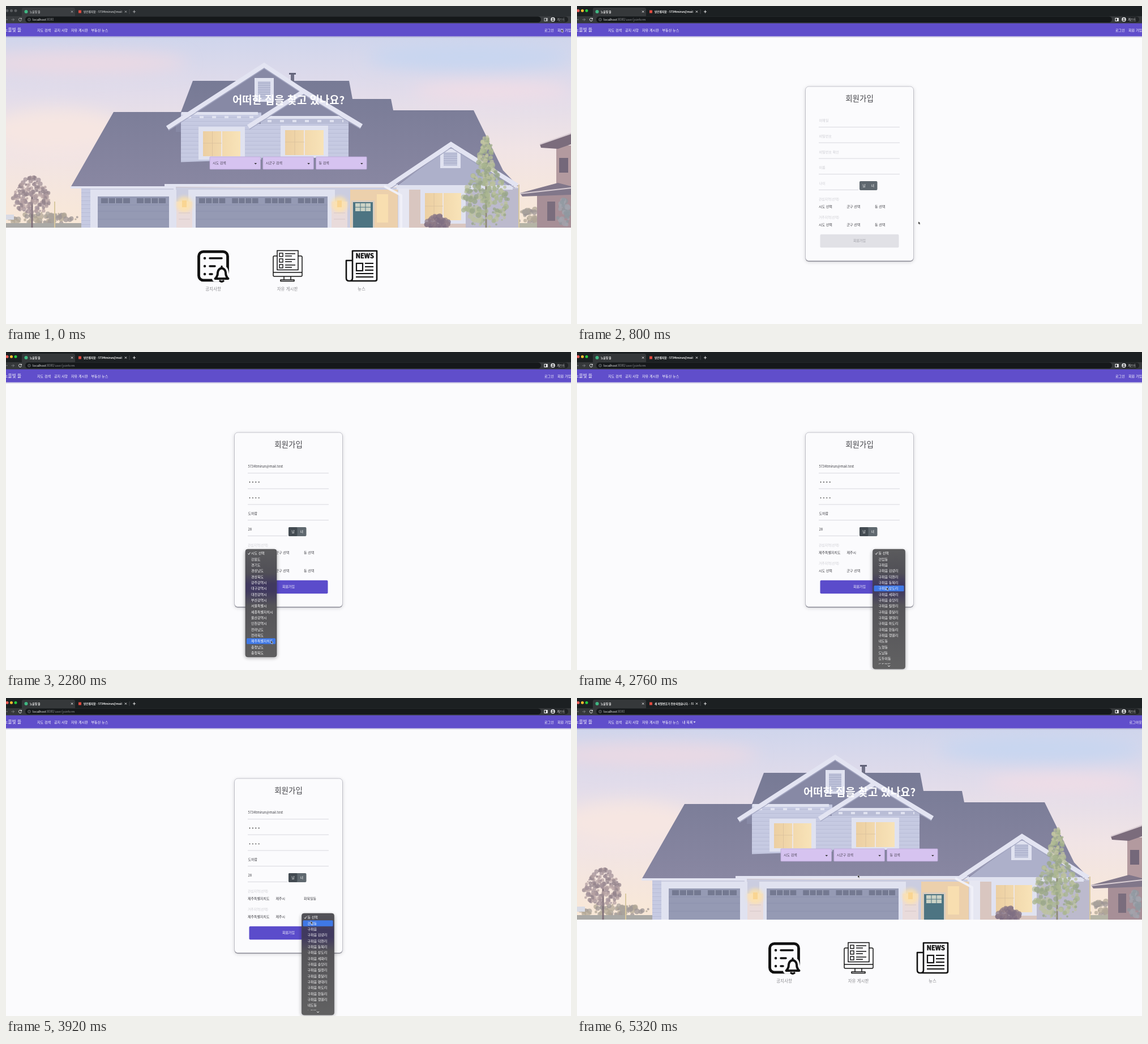
Animation of 998x561 px, one loop 5360 ms. Source, as an HTML page:

```html
<!DOCTYPE html>
<html lang="ko">
<head>
<meta charset="utf-8">
<style>
html, body { margin: 0; width: 100%; height: 100%; overflow: hidden; background: #fbfbfd; }
svg { display: block; width: 998px; height: 561px; font-family: "Noto Sans CJK KR", "Noto Sans CJK", "Noto Sans", sans-serif; }
text { white-space: pre; }
</style>
</head>
<body>
<svg viewBox="0 0 998 561">
  <defs>
    <linearGradient id="sky" x2="0" y2="1">
      <stop offset="0" stop-color="#cfd5ec"/><stop offset=".3" stop-color="#e2dcea"/>
      <stop offset=".6" stop-color="#f1e4e5"/><stop offset="1" stop-color="#f9e8d6"/>
    </linearGradient>
    <linearGradient id="roof" gradientUnits="userSpaceOnUse" x1="0" x2="0" y1="132" y2="320">
      <stop offset="0" stop-color="#777a95"/><stop offset="1" stop-color="#8987a2"/>
    </linearGradient>
    <linearGradient id="glass"><stop offset="0" stop-color="#eccfa2"/><stop offset="1" stop-color="#f8e3b8"/></linearGradient>
    <linearGradient id="menu" gradientUnits="userSpaceOnUse" x1="0" x2="0" y1="348" y2="559">
      <stop offset="0" stop-color="#5b5b5d"/><stop offset=".2" stop-color="#504f56"/>
      <stop offset=".29" stop-color="#40395f"/><stop offset=".35" stop-color="#40395f"/>
      <stop offset=".47" stop-color="#555458"/><stop offset="1" stop-color="#616162"/>
    </linearGradient>
    <pattern id="siding" width="20" height="7" patternUnits="userSpaceOnUse">
      <rect width="20" height="7" fill="#c6cae2"/><rect width="20" height="1" fill="#b9bdd7"/>
    </pattern>
    <filter id="soft" x="-50%" y="-50%" width="200%" height="200%"><feGaussianBlur stdDeviation="14"/></filter>
    <filter id="shade" x="-20%" y="-20%" width="140%" height="140%"><feGaussianBlur stdDeviation="3"/></filter>
    <clipPath id="photo"><rect y="53" width="998" height="338"/></clipPath>
    <clipPath id="tab"><rect x="137" width="69" height="18"/></clipPath>
  </defs>
  <g id="home"></g>
  <g id="live"></g>
</svg>
<script>
const LOOP = 5360, STEP = 40, ROW = 10.33;
const SITE = '노을빛 뜰', MAIL = '5734tmirun@mail.test', PERSON = '도하람';
const INK = '#3b3b40', PALE = '#cdcdd3', BRAND = '#5b4ccb';

const R = (x, y, w, h, fill, more = '') => `<rect x="${x}" y="${y}" width="${w}" height="${h}" fill="${fill}" ${more}/>`;
const P = (fill, points) => `<polygon fill="${fill}" points="${points}"/>`;
const C = (x, y, r, fill, more = '') => `<circle cx="${x}" cy="${y}" r="${r}" fill="${fill}" ${more}/>`;
const L = (d, stroke = '#111', w = 1, more = '') => `<path d="${d}" fill="none" stroke="${stroke}" stroke-width="${w}" ${more}/>`;
// y is the visual middle of the line of text
const T = (x, y, s, size = 6.1, fill = INK, more = '') =>
  `<text x="${x}" y="${(y + size * .36).toFixed(2)}" font-size="${size}" fill="${fill}" ${more}>${s}</text>`;
const MID = 'text-anchor="middle"', END = 'text-anchor="end"';
const clamp = v => Math.max(0, Math.min(1, v));
const ease = v => v * v * (3 - 2 * v);

function foliage(seed, x, y, rx, ry, n, colors, size = 4) {
  const rnd = () => (seed = seed * 16807 % 2147483647) / 2147483647;
  let out = '';
  for (let i = 0; i < n; i++) {
    const a = rnd() * 6.283, d = Math.sqrt(rnd());
    const px = x + Math.cos(a) * d * rx * (.75 + .25 * Math.sin(a)), py = y + Math.sin(a) * d * ry;
    out += C(px.toFixed(1), py.toFixed(1), (size * (.4 + rnd())).toFixed(1), colors[i % colors.length], 'opacity=".75"');
  }
  return out;
}

function house() {
  const trim = '#e0e2f0', edge = '#e3e4f2', wall = 'url(#siding)', roof = 'url(#roof)', glass = 'url(#glass)';
  const gable = (d, w = 8) => L(d, edge, w, 'stroke-linejoin="miter"');
  const windowAt = (x, y, w, h) => R(x, y, w, h, trim) + R(x + 8, y + 8, w - 16, h - 14, glass)
    + L(`M${x + w / 2} ${y + 8}v${h - 14}`, '#eee6e4', 2) + L(`M${x + 8} ${y + h / 2}h${w / 2 - 8}M${x + w / 4 + 4} ${y + 8}v${h - 14}`, '#d9bf9c', .8);
  const vent = (x, y, w, h) => R(x, y, w, h, trim) + R(x + 6, y + 6, w - 12, h - 10, '#bfc3da')
    + L(Array.from({ length: (h - 12) / 4 | 0 }, (_, i) => `M${x + 6} ${y + 9 + i * 4}h${w - 12}`).join(''), '#9ea3c1', .8);
  const garage = (x, w, panes) => {
    let out = R(x - 13, 324, w + 26, 67, trim) + R(x, 336, w, 55, '#959ab4')
      + L(`M${x} 351h${w}M${x} 362h${w}M${x} 376h${w}`, '#8a8fab', .8);
    const gap = w / panes;
    for (let i = 0; i < panes; i++)
      out += R(x + gap * i + 6, 339, gap - 12, 9, '#747991') + L(`M${x + gap * (i + .5)} 339v9M${x + gap * (i + .3)} 339v9M${x + gap * (i + .7)} 339v9`, '#b3b8cc', 1);
    return out;
  };
  const lamp = x => R(x - 14, 345, 28, 46, '#e9dbdb') + C(x, 350, 14, '#ffe3a8', 'opacity=".8" filter="url(#shade)"')
    + R(x - 4, 343, 8, 12, '#f9d592') + L(`M${x - 10} 365h20M${x - 10} 376h20`, '#d6c6c8');
  const hedge = ['#9d9696', '#aaa39c', '#b3a897'];

  return R(0, 53, 998, 338, 'url(#sky)')
    + '<g filter="url(#soft)"><ellipse cx="130" cy="100" rx="190" ry="20" fill="#efdae3" opacity=".8"/><ellipse cx="820" cy="90" rx="180" ry="24" fill="#c8d6f0"/><ellipse cx="860" cy="150" rx="140" ry="16" fill="#f0dde6"/><ellipse cx="90" cy="220" rx="120" ry="38" fill="#f6e6e2"/></g>'
    + foliage(31, 70, 374, 84, 10, 70, hedge) + foliage(37, 925, 370, 32, 13, 40, hedge)
    + R(0, 383, 140, 8, '#aaa9a6') + R(890, 383, 60, 8, '#b5b4a6') + R(0, 368, 14, 9, '#d9dbe5')
    + L('M86 345v46M906 315v76', '#d8c8a0', 2)
    + L('M46 325V391', '#81717a', 3) + foliage(11, 45, 334, 42, 33, 190, ['#a3929a', '#b5a2a3', '#96868e'], 3)
    + P(roof, '114,320 190,187 309,187 330,132 606,132 612,164 680,164 684,184 826,184 878,290 905,318 700,318')
    + R(503, 118, 6, 16, '#6f7086') + R(500, 118, 12, 3, '#626379')
    + P('#8789a5', '456,104 300,208 300,222 606,222 606,195')
    + R(309, 188, 142, 88, wall) + R(450, 196, 155, 72, wall)
    + P('#8789a5', '526,152 440,208 618,208') + R(450, 196, 155, 12, '#b9bdd6')
    + R(310, 187, 135, 5, trim) + R(450, 194, 155, 5, trim)
    + L('M320 196h120M462 203h134', trim, 4, 'stroke-dasharray="7 15"')
    + vent(439, 127, 34, 42)
    + gable('M285 215L456 104.500L545 163') + L('M287 219.500L456 110L541 166', '#a6a9c4', 1.2)
    + gable('M428 213L526 150.500L628 212') + L('M430 217.500L526 156L626 216.500', '#a6a9c4', 1.2)
    + windowAt(340, 213, 82, 58) + windowAt(485, 211, 84, 58)
    + P(roof, '290,276 606,266 700,266 700,318 270,318')
    + R(133, 320, 772, 71, '#cbcde0') + R(133, 320, 16, 71, wall)
    + R(114, 318, 186, 4, edge) + R(280, 314, 412, 5, edge) + R(296, 319, 4, 72, edge)
    + garage(162, 126, 2) + garage(335, 233, 4) + lamp(315) + lamp(589)
    + R(608, 324, 84, 67, '#ecd0ac') + R(655, 332, 20, 50, '#f8deb0')
    + R(610, 343, 41, 48, '#d9cdc0') + R(613, 346, 35, 45, '#4d7482') + R(617, 348, 27, 14, '#ccd3c6') + L('M626 348v14M635 348v14M617 355h27', '#4d7482')
    + R(712, 322, 100, 69, '#d9c6c0') + R(812, 322, 93, 69, '#bcbacd') + windowAt(732, 322, 80, 62)
    + P('#adb0ca', '786,246 690,318 890,318') + R(690, 316, 205, 8, trim)
    + vent(767, 252, 36, 34)
    + gable('M674 319L786 244L903 317') + L('M678 323L786 250L899 321', '#a2a5c0', 1.2)
    + R(693, 322, 19, 69, '#e6e7f2') + L('M668 318l30 16v57', '#f0f0f8', 4)
    + foliage(5, 764, 381, 28, 12, 70, ['#7f6f83', '#8f7c88'])
    + L('M848 260V391', '#8e8a78', 3)
    + foliage(23, 848, 262, 17, 32, 85, ['#b2bb96', '#9fac8b', '#c1c4a2'], 3.4)
    + foliage(77, 848, 335, 52, 56, 260, ['#a9b590', '#bcc29f', '#98a688'], 3.6)
    + R(972, 246, 26, 145, '#b39a9f') + P('#7b6c7c', '943,244 998,224 998,244 975,252 945,250')
    + R(938, 332, 60, 59, '#a78f97') + P('#81778a', '908,330 975,312 998,318 998,333 912,336')
    + L('M943 244L998 225M908 331L998 321', '#d9cdd3', 2)
    + R(977, 268, 16, 26, '#74687a') + R(956, 345, 14, 34, '#7a6d7d')
    + foliage(41, 985, 365, 14, 24, 40, ['#a1a4ad', '#8f98a0']);
}

function icons() {
  const round = 'stroke-linecap="round" stroke-linejoin="round"';
  const bell = 'M369.500 481q4.500-4 4.500-11q1-6.500 7-7.500q6 1 7 7.500q0 7 4.500 11z';
  const notice = R(340.5, 433.3, 51, 50.5, 'none', 'rx="8" stroke="#111" stroke-width="4.8"')
    + L('M351 445h.1M351 459h.1M351 473h.1', '#111', 4.4, round) + L('M360 445h21M360 459h9M360 473h4', '#111', 3.6, round)
    + `<path d="${bell}" fill="#fbfbfd" stroke="#fbfbfd" stroke-width="11" stroke-linejoin="round"/>`
    + `<path d="${bell}" fill="#fbfbfd" stroke="#111" stroke-width="4" stroke-linejoin="round"/>`
    + L('M381 459.500v2M378 485q3 2.500 6 0', '#111', 3.4, round);
  let board = R(479, 431.5, 37, 34, '#fbfbfd', 'stroke="#111" stroke-width="1.5"')
    + L('M479 441h-5q-2 0-2 2v32q0 2 2 2h47q2 0 2-2v-32q0-2-2-2h-5M472 470h51M491 477v6M503 477v6M485 485.500v-2.500h24v2.500z', '#111', 1.5, round);
  for (const y of [436, 446, 456]) board += R(483, y, 6, 6, 'none', 'stroke="#111" stroke-width="1.4"') + L(`M493 ${y + 1}h18M493 ${y + 5}h12`, '#111', 1.4);
  const news = L('M612 432h43v50q0 3-3 3h-46q-5 0-5-5v-31h11zM612 449v31q0 5-5 5', '#111', 2.6, round)
    + T(633.8, 441, 'NEWS', 11, '#111', MID + ' font-weight="900" stroke="#111" stroke-width=".5"')
    + R(619, 454, 11, 13, 'none', 'stroke="#111" stroke-width="2.2"')
    + L('M634 454h15M634 460h15M634 466h15M618 472h31M618 478h31', '#111', 2);
  return notice + board + news;
}

document.getElementById('home').innerHTML = `<g clip-path="url(#photo)">${house()}</g>`
  + T(499, 166, '어떠한 집을 찾고 있나요?', 18.8, '#fff', MID + ' font-weight="700"')
  + ['시도 검색', '시군구 검색', '동 검색'].map((s, i) => {
    const x = 360 + i * 93.8;
    return R(x, 266, 89.5, 22, '#d6c3f0', 'rx="1" stroke="#b9a6d6" stroke-width=".8"') + T(x + 5, 277, s, 6, '#4a4454') + P('#333', `${x + 78.5},277 ${x + 83},277 ${x + 80.8},279.5`);
  }).join('')
  + icons()
  + T(366, 499, '공지사항', 7.5, '#8a8a8e', MID) + T(497, 499, '자유 게시판', 7.5, '#8a8a8e', MID) + T(628, 499, '뉴스', 7.5, '#8a8a8e', MID);

const regions = '시도 선택,강원도,경기도,경상남도,경상북도,광주광역시,대구광역시,대전광역시,부산광역시,서울특별시,세종특별자치시,울산광역시,인천광역시,전라남도,전라북도,제주특별자치도,충청남도,충청북도'.split(',');
const cities = ['군구 선택', '서귀포시', '제주시'];
const towns = ['동 선택', '건입동', '구좌읍',
  ...'김녕 덕천 동복 상도 세화 송당 월정 종달 평대 하도 한동 행원'.split(' ').map(s => `구좌읍 ${s}리`),
  ...'내도 노형 도남 도두이 도두일 도련이 도련일 봉개 삼도이 삼도일 삼양이 삼양일 아라이 아라일 연 영평 오등 오라이 오라일 외도일 용담일 월평 이도이 화북이 화북일 회천'.split(' ').map(s => s + '동')];
const lists = [regions, cities, towns];
const menuX = [423, 472, 522.5], menuW = [55, 48, 57], menuY = [348, 380];

const menus = [
  { row: 0, col: 0, open: 2120, close: 2360, pick: 15 },
  { row: 0, col: 1, open: 2480, close: 2600, pick: 2 },
  { row: 0, col: 2, open: 2680, close: 3200, pick: towns.length - 2, scroll: [2840, 3120] },
  { row: 1, col: 0, open: 3360, close: 3600, pick: 15 },
  { row: 1, col: 1, open: 3680, close: 3800, pick: 2 },
  { row: 1, col: 2, open: 3880, close: 4080, pick: 3 }
];

const fields = [
  { label: '이메일', value: MAIL, y: 202, from: 900, to: 1240 },
  { label: '비밀번호', value: '••••', y: 229.5, from: 1280, to: 1400 },
  { label: '비밀번호 확인', value: '••••', y: 257.3, from: 1440, to: 1560 },
  { label: '이름', value: PERSON, y: 285, from: 1600, to: 1720 },
  { label: '나이', value: '28', y: 312.7, w: 70, from: 1760, to: 1880 }
];
const loginFields = [
  { label: '이메일', value: MAIL, y: 254, from: 4520, to: 4840 },
  { label: '비밀번호', value: '••••••••', y: 281.5, from: 4880, to: 5040 }
];

// time, x, y of the pointer tip
const trail = [
  [0, 981, 41], [240, 981, 41], [720, 603, 380], [800, 603, 380], [900, 470, 202],
  [1840, 470, 312], [1960, 507, 316], [2080, 445, 353], [2140, 445, 353], [2280, 468, 509], [2360, 468, 509],
  [2460, 488, 353], [2500, 488, 353], [2580, 490, 375], [2600, 490, 375], [2680, 535, 353],
  [2760, 547, 415], [2840, 548, 430], [3080, 548, 541], [3200, 548, 541], [3340, 446, 385], [3420, 446, 385],
  [3560, 452, 541], [3600, 452, 541], [3680, 488, 385], [3760, 490, 407], [3800, 490, 407],
  [3880, 535, 385], [4000, 548, 418], [4080, 548, 418], [4180, 510, 413], [4280, 510, 413],
  [4480, 470, 254], [5060, 496, 312], [LOOP, 496, 312]
];

function pointer(t) {
  const i = Math.max(1, trail.findIndex(k => k[0] > t));
  const a = trail[i - 1], b = trail[i], p = ease(clamp((t - a[0]) / (b[0] - a[0])));
  return [a[1] + (b[1] - a[1]) * p, a[2] + (b[2] - a[2]) * p];
}

function card(y, h, title, titleY) {
  return R(403.5, y + 1.5, 191, h, '#77777f', 'rx="6" opacity=".35" filter="url(#shade)"')
    + R(403.5, y + 1, 191, h, '#8f8f98', 'rx="6"')
    + R(403.5, y, 191, h - .5, '#fbfbfd', 'rx="6" stroke="#b8b8c2" stroke-width=".8"')
    + T(499, titleY, title, 13.5, '#444449', MID);
}

function field(f, t, blur) {
  const w = f.w || 143, focused = t >= f.from - 40 && t < blur;
  const text = f.value.slice(0, Math.ceil(f.value.length * clamp((t - f.from) / (f.to - f.from))));
  let out = focused
    ? R(427.5, f.y - 9, w, 19.5, '#fdfdff', 'stroke="#5878b4" stroke-width="1.1"')
    : L(`M427 ${f.y + 11.7}h${w}`, '#d4d4db', .9);
  if (!text) out += T(427.5, f.y, f.label, 6.1, PALE);
  else if (text[0] === '•') out += [...text].map((_, i) => C(430.5 + i * 5.4, f.y, .9, '#333')).join('');
  else out += T(427.5, f.y, text, 5.95);
  if (focused && text && text[0] !== '•') out += L(`M${428.5 + text.length * (/[가-힣]/.test(text) ? 5.5 : 3.35)} ${f.y - 3.5}v7`, '#222', .7);
  return out;
}

const fieldSet = (set, t, end) => set.map((f, i) => field(f, t, set[i + 1] ? set[i + 1].from - 40 : end)).join('');

const button = (y, s, on) => R(429.5, y, 139, 23.5, on ? BRAND : '#e1e1e6', 'rx="2"')
  + T(499, y + 11.3, s, 6, on ? '#fff' : '#9b9ba2', MID);

function joinPage(t) {
  const chosen = t >= 1960;
  let out = card(142, 308, '회원가입', 163) + fieldSet(fields, t, 1960)
    + R(499, 309, 31.5, 16, '#5f686f', 'rx="2"') + (chosen ? R(499, 309, 15.5, 16, '#434b52', 'rx="2"') : '')
    + T(507, 317, '남', 6, '#fff', MID) + T(522.3, 317, '녀', 6, '#fff', MID);
  ['관심지역(선택)', '거주지역(선택)'].forEach((s, row) => {
    out += T(427, 341 + row * 31.7, s, 5.8, PALE);
    lists.forEach((list, col) => {
      const m = menus.find(m => m.row === row && m.col === col);
      out += T(427 + col * 49.5, 354 + row * 32, list[t >= m.close ? m.pick : 0], 6);
    });
  });
  return out + button(402.7, '회원가입', chosen);
}

function menuBox(t, [cx, cy]) {
  const m = menus.find(m => t >= m.open && t < m.close);
  if (!m) return '';
  const x = menuX[m.col], y = menuY[m.row], w = menuW[m.col], items = lists[m.col];
  const full = items.length * ROW + 4, h = Math.min(full, 559 - y), range = full - h;
  const scroll = m.scroll ? range * ease(clamp((t - m.scroll[0]) / (m.scroll[1] - m.scroll[0]))) : 0;
  const up = scroll > 1, down = range - scroll > 1;
  const top = y + (up ? 9 : 1), bottom = y + h - (down ? 8 : 1);
  const hover = cx > x && cx < x + w && cy > y && cy < y + h ? Math.floor((cy - y - 2 + scroll) / ROW) : -1;
  let rows = '';
  items.forEach((s, i) => {
    const ry = y + 2 + i * ROW - scroll;
    if (ry < y - ROW || ry > y + h) return;
    if (i === hover) rows += R(x + 2, ry, w - 4, ROW, '#3f78e6', 'rx="1.5"');
    if (!i) rows += L(`M${x + 4.5} ${ry + 5.5}l1.4 1.8l2.5-4`, '#fff', .9);
    rows += T(x + 10, ry + 5.2, s, 6, '#fff', 'font-weight="500"');
  });
  return R(x - 1, y + 2, w + 2, h, '#000', 'rx="5" opacity=".3" filter="url(#shade)"')
    + R(x, y, w, h, 'url(#menu)', 'rx="4" stroke="#47474a" stroke-width=".6"')
    + `<clipPath id="rows">${R(x, top, w, bottom - top, '#000')}</clipPath><g clip-path="url(#rows)">${rows}</g>`
    + (up ? L(`M${x + w / 2 - 2} ${y + 6}l2-2l2 2`, '#fff', .9) : '')
    + (down ? L(`M${x + w / 2 - 2} ${y + h - 6}l2 2l2-2`, '#fff', .9) : '');
}

const loginPage = t => card(196, 200.5, '로그인', 217) + fieldSet(loginFields, t, 5080)
  + button(308, '로그인', t >= 5060) + button(336, '회원가입', false)
  + T(485, 370, '비밀번호를 잊으셨나요?', 4.45) + T(557, 370, '비밀번호 찾기', 4.5, '#6a4de0', END);

function browser(t, page, member) {
  const on = t >= 120, fg = on ? '#f4f4f4' : '#b4b6b8', dim = '#8c8f92';
  const path = { home: '', join: '/user/joinform', login: '/user/login' }[page];
  const title = t < 4400 ? `받은편지함 - ${MAIL.slice(0, 15)}` : '새 비밀번호가 전송되었습니다. - 57';
  const bold = 'font-weight="700"';
  return R(0, 0, 998, 19, on ? '#1c2022' : '#2b2f32') + R(28, 3, 94, 17, on ? '#35383a' : '#3a3d40', 'rx="3"') + R(0, 18, 998, 13, on ? '#35383a' : '#3a3d40')
    + ['#fb5f57', '#fdbc2e', '#28c840'].map((c, i) => C(2 + i * 7.5, 8.3, 2.5, on ? c : '#5a5d60')).join('')
    + C(35.5, 10, 3, '#41b883') + T(42, 10, SITE, 4.7, fg, bold)
    + R(128, 7.5, 5, 5, '#e04a3f') + `<g clip-path="url(#tab)">${T(137, 10, title, 4.7, fg, bold)}</g>`
    + L('M115 8.4l3.2 3.2m0-3.2l-3.2 3.2M209.9 8.4l3.2 3.2m0-3.2l-3.2 3.2M224 10h5M226.5 7.5v5', fg, .9) + L('M218 6v8', '#54575a', .7)
    + R(34, 18.5, 911, 10.5, '#15181a', 'rx="5.2"')
    + L('M-2 24h5M9.500 24h5m-2.300-2.300l2.300 2.300l-2.300 2.300', dim, .8) + L('M27 22.300a2.600 2.600 0 1 0 .5 2.200M27.500 21v2h-2', fg, .9)
    + C(41, 24, 2.4, 'none', `stroke="${dim}" stroke-width=".7"`) + L('M41 23.500v1.700M41 22.500v.5', dim, .7)
    + T(47, 24, `<tspan font-weight="500">localhost</tspan><tspan fill="${dim}">:8080${path}</tspan>`, 5.5, '#f4f4f4')
    + R(951, 21.5, 5, 5, 'none', `stroke="${fg}"`) + R(954, 21.5, 2.5, 5, fg)
    + R(961, 18.8, 32, 10, '#1f2224', 'rx="5"') + C(966, 23.7, 4, '#d5d7d9') + C(966, 22.5, 1.3, '#444') + R(963.8, 24.6, 4.4, 1.7, '#444', 'rx=".8"')
    + T(973, 24, '게스트', 5.3, fg)
    + R(0, 53.5, 998, 2, '#8d84b8', 'opacity=".35"') + R(0, 30.5, 998, 23, '#604ecb')
    + T(27, 42.5, SITE, 7.7, '#fff', END)
    + [[55, '지도 검색'], [85, '공지 사항'], [115, '자유 게시판'], [150.5, '부동산 뉴스']].map(([x, s]) => T(x, 42.5, s, 6.1, '#fff')).join('')
    + (member
      ? T(186, 42.5, '내 목록', 6.1, '#fff') + P('#fff', '205.5,41.5 209.500,41.5 207.500,43.8') + T(975.5, 42.5, '로그아웃', 6.1, '#fff')
      : T(951, 42.5, '로그인', 6.1, '#fff') + T(974, 42.5, '회원 가입', 6.1, '#fff'));
}

const home = document.getElementById('home'), live = document.getElementById('live');
let drawn = -1;

function draw(t) {
  const member = t >= 5120;
  const page = t < 240 || member ? 'home' : t < 4280 ? 'join' : 'login';
  const tip = pointer(t);
  const typing = (t >= 920 && t < 1880) || (t >= 4520 && t < 5040);
  home.style.display = page === 'home' ? '' : 'none';
  live.innerHTML = browser(t, page, member)
    + (page === 'join' ? joinPage(t) + menuBox(t, tip) : page === 'login' ? loginPage(t) : '')
    + (typing ? '' : `<path transform="translate(${tip})" d="M0 0v5.200l1.200-1.100l.9 2l1-.4l-.9-2h1.700z" fill="#111" stroke="#fff" stroke-width=".5"/>`);
}

function tick() {
  const t = Math.floor(performance.now() % LOOP / STEP) * STEP;
  if (t !== drawn) draw(drawn = t);
  requestAnimationFrame(tick);
}
tick();
</script>
</body>
</html>
```
